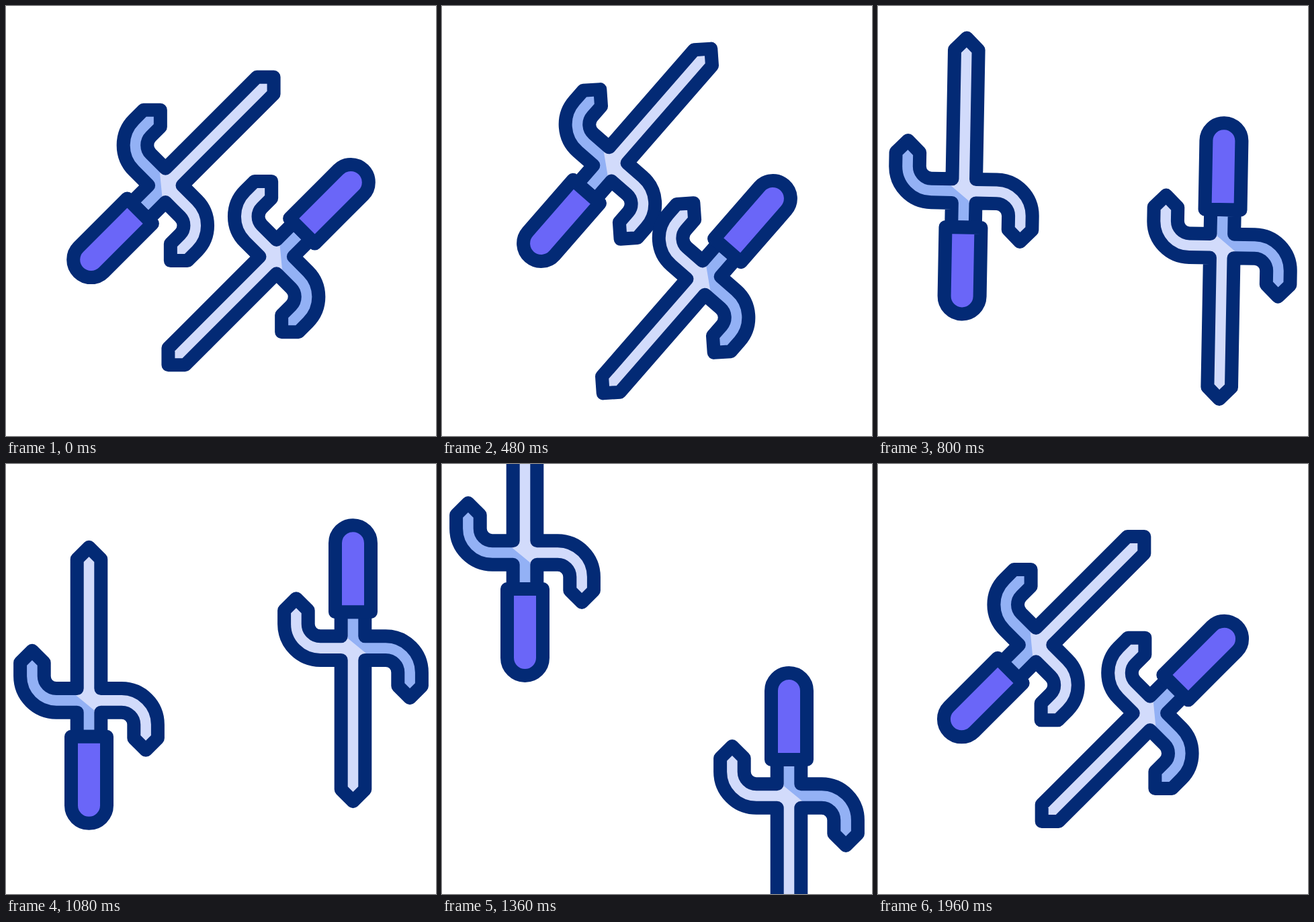
Write an HTML page that moves like this. It is 640x640 px and loops after 2000 ms.

```html
<!DOCTYPE html>
<html lang="en">
<head>
<meta charset="utf-8">
<title>Twin sai</title>
<style>
  html, body { margin: 0; width: 100%; height: 100%; overflow: hidden; background: #fff; }
  svg { display: block; width: 100%; height: 100%; }
  .outline { stroke: #032a75; stroke-width: 20; stroke-linejoin: round; }
</style>
</head>
<body>
<svg viewBox="0 0 640 640">
  <defs>
    <path id="steel" d="M0-228 17.8-210.2V-17.8H48.6A53.8 53.8 0 0 1 102.4 36V56.2L84.6 74 66.8 56.2V36
      A18.2 18.2 0 0 0 48.6 17.8H17.8V54H-17.8V17.8H-48.6A53.8 53.8 0 0 1-102.4-36V-56.2L-84.6-74-66.8-56.2V-36
      A18.2 18.2 0 0 0-48.6-17.8H-17.8V-210.2Z"/>
    <clipPath id="shade"><path d="M-130-100H-20V-8L8 15V60H-130Z"/></clipPath>
    <!-- Blade points up, guard crosses at the local origin -->
    <g id="sai">
      <use href="#steel" fill="#d2dbfb"/>
      <use href="#steel" fill="#93b1f5" clip-path="url(#shade)"/>
      <use href="#steel" fill="none" class="outline"/>
      <path class="outline" fill="#6a66f8" d="M-26.5 54H26.5V156.5A26.5 26.5 0 0 1-26.5 156.5Z"/>
    </g>
  </defs>
  <use id="left" href="#sai"/>
  <g transform="rotate(180 320 320)"><use id="right" href="#sai"/></g>
</svg>
<script>
  const LOOP = 2000;
  const STEP = 40; // the picture is held at 25 frames per second
  const PIVOT = 190; // distance from guard to the handle end it turns about
  const REST = { x: 103, y: 401.3 };
  const SLIDE = 22.6;
  const UPRIGHT_X = 123.5;

  // Each sai sinks to its own depth before it shoots off
  const sais = [
    { node: document.getElementById('left'), lowY: 542 },
    { node: document.getElementById('right'), lowY: 556 }
  ];

  const ease = (t, from, to) => {
    const u = Math.min(1, Math.max(0, (t - from) / (to - from)));
    return u * u * (3 - 2 * u);
  };
  const mix = (a, b, s) => a + (b - a) * s;

  function pose(t, lowY) {
    if (t >= 1700) {
      const away = 291 * ((LOOP - t) / 280) ** 2.5;
      return { x: REST.x - away, y: REST.y + away, angle: 45 };
    }
    const slide = SLIDE * ease(t, 280, 480);
    const sink = ease(t, 485, 1090);
    const launch = 220 * (Math.max(0, t - 1090) / 270) ** 3.25;
    return {
      x: mix(REST.x + slide, UPRIGHT_X, sink),
      y: mix(REST.y - slide, lowY, sink) - launch,
      angle: 45 * (1 - ease(t, 400, 840))
    };
  }

  function draw(now) {
    const t = Math.floor(now % LOOP / STEP) * STEP;
    const hidden = t >= 1440 && t < 1700;
    for (const { node, lowY } of sais) {
      const { x, y, angle } = pose(t, lowY);
      node.setAttribute('visibility', hidden ? 'hidden' : 'visible');
      node.setAttribute('transform', `translate(${x} ${y}) rotate(${angle}) translate(0 ${-PIVOT})`);
    }
  }

  const start = performance.now();
  function tick() {
    draw(performance.now() - start);
    requestAnimationFrame(tick);
  }
  tick();
</script>
</body>
</html>
```
